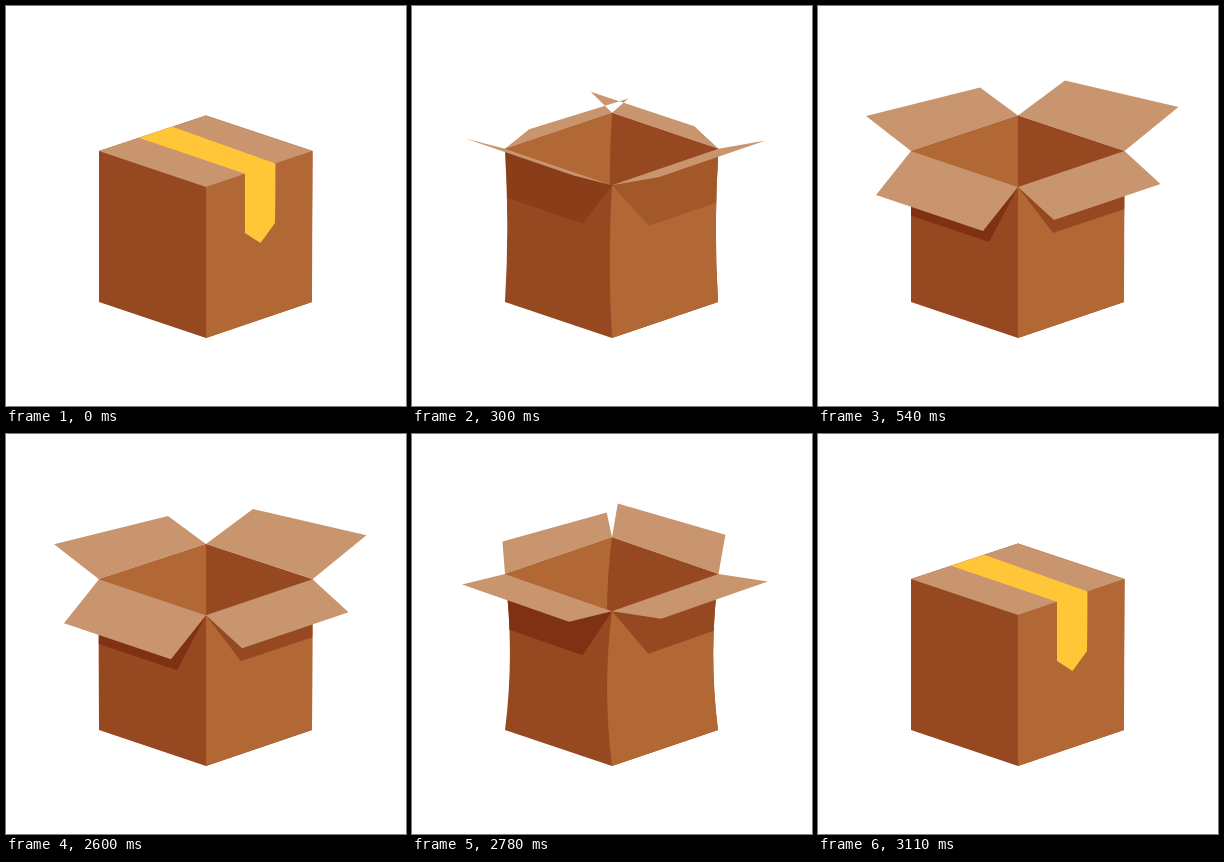
An HTML page with a canvas that plays this animation: 400x400 px, repeating every 4.14 s.

```html
<!DOCTYPE html>
<html lang="en">
<head>
<meta charset="utf-8">
<title>Box</title>
<style>
  html, body { margin: 0; width: 100%; height: 100%; overflow: hidden; background: #fff; }
  canvas { display: block; }
</style>
</head>
<body>
<canvas id="stage" width="400" height="400"></canvas>
<script>
const ctx = document.getElementById('stage').getContext('2d');
const STEP = 30, STEPS = 18, CLOSE_AT = 2600, LOOP = 4140;
const SQUASHED = 7; // the lid springs open after this step
const LEFT = '#964820', RIGHT = '#b16835', LID = '#c9956f', TAPE = '#ffc638', SHADE = '#7e3213';
const FRONT_SWEEP = 216, BACK_SWEEP = 142; // degrees from closed to open

const mix = (a, b, u) => a + (b - a) * u;
const between = (p, q, u) => [mix(p[0], q[0], u), mix(p[1], q[1], u)];
const sin = deg => Math.sin(deg * Math.PI / 180);
const easeOut = (k, start, power) => 1 - Math.max(0, 1 - Math.max(0, k - start) / (STEPS - start)) ** power;

// Swings an offset along the ellipse that joins its closed and open positions.
function swing(closed, open, sweep, u) {
  const a = sin(sweep * (1 - u)) / sin(sweep), b = sin(sweep * u) / sin(sweep);
  return [closed[0] * a + open[0] * b, closed[1] * a + open[1] * b];
}

// Winds up to a full squash, then rebounds and settles.
function squashAt(k) {
  if (k <= SQUASHED) return sin(90 * k / SQUASHED) ** 2;
  const rest = (STEPS - k) / (STEPS - SQUASHED);
  return sin(90 + 36 * (k - SQUASHED)) * rest ** 1.5;
}

// A point with four numbers is a quadratic curve: control, then end.
function trace(points) {
  points.forEach((p, i) => {
    if (!i) ctx.moveTo(...p);
    else if (p.length > 2) ctx.quadraticCurveTo(...p);
    else ctx.lineTo(...p);
  });
  ctx.closePath();
}

function fill(color, ...shapes) {
  ctx.fillStyle = color;
  ctx.beginPath();
  shapes.forEach(trace);
  ctx.fill('evenodd');
}

function fillInside(clip, color, shape) {
  ctx.save();
  ctx.beginPath();
  trace(clip);
  ctx.clip();
  fill(color, shape);
  ctx.restore();
}

function flap(p, q, dp, dq = dp) {
  return [p, [p[0] + dp[0], p[1] + dp[1]], [q[0] + dq[0], q[1] + dq[1]], q];
}

function drawTape(s, L, B, F, R) {
  const inner = between(F, R, .366), outer = between(F, R, .652);
  fill(TAPE, [
    between(L, B, .374), between(L, B, .685), outer,
    [outer[0] + 6 * s, 195 + 8 * s, 269 + 7 * s, 217 + 14 * s],
    [254.5 + 7.5 * s, 237 + 13 * s],
    [239 + 7.5 * s, 227 + 13 * s],
    [inner[0] + 5 * s, 200 + 8 * s, ...inner]
  ]);
}

function draw(k) {
  const s = squashAt(k);
  const L = [93, 145 + 12 * s], R = [306.5, 145 + 12 * s];
  const B = [200, 109.5 + 15 * s], F = [200, 181 + 9 * s];
  const low = 296 + 2 * Math.max(s, 0), mid = 222 + 6 * s, edgeMid = 256 + 5 * s;
  const bend = s > 0 ? 12 * s : 24 * s;
  const leftSide = [93 - 24 * s, mid, ...L], rightSide = [306 + bend, mid, 306, low];
  const foot = [200, 332], leftFoot = [93, low], top = [L, B, R, F];
  const leftFace = [L, F, [200 + bend, edgeMid, ...foot], leftFoot, leftSide];
  const rightFace = [F, R, rightSide, foot, [200 + bend, edgeMid, ...F]];

  ctx.clearRect(0, 0, 400, 400);
  fill(LEFT, [L, B, R, rightSide, foot, leftFoot, leftSide]);
  fill(RIGHT, rightFace);
  if (k <= SQUASHED) {
    fill(LID, top);
    drawTape(s, L, B, F, R);
    return;
  }

  const front = easeOut(k, 6, 3.15), back = easeOut(k, 8.5, 3.28);
  const swingFront = (closed, open) => swing(closed, open, FRONT_SWEEP, front);
  const swingBack = (closed, open) => swing(closed, open, BACK_SWEEP, back);

  ctx.globalAlpha = Math.min(1, Math.max(0, (k - 9) / 2));
  fillInside(leftFace, SHADE, flap(L, F, between([-31, -5], [-29, 55], front)));
  fillInside(rightFace, LEFT, flap(F, R, between([42, 26], [35, 46], front)));
  ctx.globalAlpha = 1;

  fill(LEFT, top);
  fillInside(top, RIGHT, [B, [200 + bend, 180, 200, 250], [93, 250], L]);
  // overlapping back flaps cancel out
  fill(LID,
    flap(L, B, swingBack([55, 19], [-45, -35]), swingBack([44, 16], [-38, -28])),
    flap(B, R, swingBack([-55, 18], [47, -35]), swingBack([-63, 25], [54, -44])));
  fill(LID, flap(L, F, swingFront([43, -14], [-35, 44])));
  fill(LID, flap(F, R, swingFront([-49, -10], [36, 33])));
}

function frame() {
  const t = performance.now() % LOOP;
  const k = t < CLOSE_AT
    ? Math.min(STEPS, Math.floor(t / STEP))
    : Math.max(0, STEPS - 1 - Math.floor((t - CLOSE_AT) / STEP));
  draw(k);
  requestAnimationFrame(frame);
}
frame();
</script>
</body>
</html>
```
